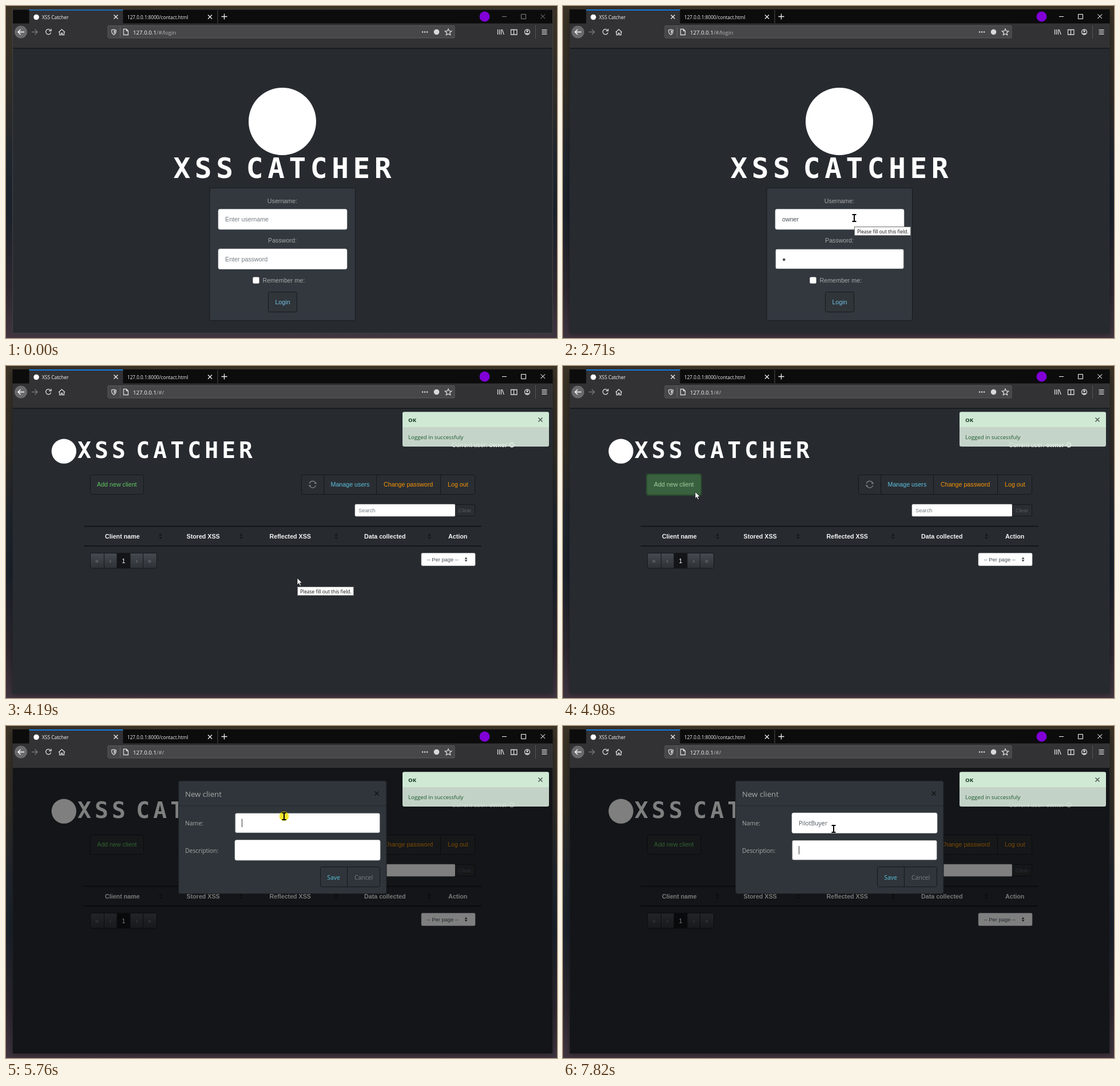
Write an HTML page that moves like this. It is 963x581 px and loops after 8 s.

```html
<!DOCTYPE html>
<html lang="en">
<head>
<meta charset="utf-8">
<title>XSS Catcher</title>
<style>
html, body { margin: 0; width: 100%; height: 100%; overflow: hidden; background: #1d2229; }
svg { display: block; width: 963px; height: 581px; }
text { font: 10.7px "Liberation Sans", Arial, sans-serif; white-space: pre; }
.ui { font-family: "Open Sans", "Noto Sans", sans-serif; font-size: 10.4px; }
.tab { font-size: 8.4px; }
.url { font-size: 9.7px; }
.mid { text-anchor: middle; }
.b, .b text { font-weight: bold; }
.small { font-size: 9.33px; }
.mark { font: bold 49.4px "DejaVu Sans Mono", monospace; letter-spacing: 7.6px; word-spacing: -22px; fill: #fff; }
.hint { fill: #757c83; }
.label { fill: #aaa; }
.typed { fill: #495057; }
.caret { fill: #333; }
.input { fill: #fff; stroke: #d0d3d6; stroke-width: .6; }
.focus { fill: none; stroke: #32383e; stroke-width: 1.5; }
.btn { fill: #2a2e33; stroke: #15171a; }
.line { fill: none; stroke: #d8d8da; stroke-width: 1.3; }
.green { fill: #62c462; }
.blue { fill: #5bc0de; }
.orange { fill: #f89406; }

.step, .tween { animation: 8s step-end infinite; }
.tween { animation-timing-function: linear; }
.idle { animation-name: idle; }
.active { animation-name: active; }
.login { animation-name: login; }
.home { animation-name: home; }
.toast { animation-name: toast; }
.tip { animation-name: tip; }
.press { animation-name: press; }
.dim { animation-name: dim; }
.modal { animation-name: fade; }
.slide { animation-name: slide; }
.cursor { animation-name: path; }
.arrow { animation-name: arrow; }
.beam { animation-name: beam; }
.click { animation-name: click; }

@keyframes idle { 0% { opacity: 1 } 8.625%, 100% { opacity: 0 } }
@keyframes active { 0% { opacity: 0 } 8.625%, 100% { opacity: 1 } }
@keyframes login { 0% { opacity: 1 } 48.5%, 100% { opacity: 0 } }
@keyframes home { 0% { opacity: 0 } 48.5%, 100% { opacity: 1 } }
@keyframes toast { 0%, 49.5% { opacity: 0 } 51.5%, 100% { opacity: 1 } }
@keyframes tip { 0% { opacity: 0 } 19.1% { opacity: 1 } 54.35%, 100% { opacity: 0 } }
@keyframes press { 0%, 61.2% { opacity: 0 } 63.1%, 68.1% { opacity: 1 } 70%, 100% { opacity: 0 } }
@keyframes dim { 0%, 65.6% { opacity: 0 } 67.5%, 100% { opacity: .5 } }
@keyframes fade { 0%, 65.46% { opacity: 0 } 67.34%, 100% { opacity: 1 } }
@keyframes slide {
  0% { transform: translateY(-33px) }
  65.46% { transform: translateY(-33px); animation-timing-function: ease-out }
  69.2%, 100% { transform: none }
}
@keyframes path {
  0% { transform: translate(-50px, -50px); animation-timing-function: step-end }
  1.75% { transform: translate(790px, 550px) }
  2.625% { transform: translate(600px, 455px) }
  3.625%, 5.6% { transform: translate(400px, 348px) }
  8%, 54.3% { transform: translate(509px, 371px) }
  55.4%, 57.2% { transform: translate(437px, 394px) }
  61.5%, 67.1% { transform: translate(231px, 220px) }
  71%, 73% { transform: translate(486px, 158px) }
  76.1%, 100% { transform: translate(473px, 180px) }
}
@keyframes arrow { 0% { opacity: 1 } 6.5% { opacity: 0 } 48.5% { opacity: 1 } 70%, 100% { opacity: 0 } }
@keyframes beam { 0% { opacity: 0 } 6.5% { opacity: 1 } 48.5% { opacity: 0 } 70%, 100% { opacity: 1 } }
@keyframes click {
  0% { opacity: 0 } 8.625% { opacity: .8 } 10% { opacity: 0 }
  63.1% { opacity: .8 } 64.2% { opacity: 0 }
  71.9% { opacity: .8 } 73.1%, 100% { opacity: 0 }
}
</style>
</head>
<body>
<svg viewBox="0 0 963 581">
  <defs>
    <linearGradient id="wall" x2="0" y2="1">
      <stop offset="0" stop-color="#3b3326"/>
      <stop offset=".25" stop-color="#302c26"/>
      <stop offset=".45" stop-color="#20262e"/>
      <stop offset=".62" stop-color="#1a212a"/>
      <stop offset=".85" stop-color="#2e2730"/>
      <stop offset="1" stop-color="#403540"/>
    </linearGradient>
    <linearGradient id="pager" x2="0" y2="1">
      <stop offset="0" stop-color="#454a50"/>
      <stop offset="1" stop-color="#2e3237"/>
    </linearGradient>
    <filter id="blur" x="-5%" y="-5%" width="110%" height="110%"><feGaussianBlur stdDeviation="5"/></filter>
    <path id="x" d="M-3.5-3.5 3.5 3.5M3.5-3.5-3.5 3.5"/>
    <path id="sort" d="M-3-1 0-5 3-1zM-3 1 0 5 3 1z"/>
    <circle id="brand" cx="483" cy="202" r="59" fill="#fff"/>
  </defs>

  <!-- Desktop -->
  <rect width="963" height="581" fill="url(#wall)"/>
  <rect class="step active" x="11" y="12" width="945" height="563" fill="#000" fill-opacity=".35" filter="url(#blur)"/>
  <rect x="11.5" y="6" width="944" height="567" fill="#272b30"/>

  <!-- Login page -->
  <g class="step login">
    <use href="#brand"/>
    <text class="mark" x="292.5" y="301">XSS CATCHER</text>
    <rect x="356" y="318.5" width="254.5" height="232" rx="3" fill="#32383e" stroke="#17191c"/>
    <text class="label mid" x="483" y="345">Username:</text>
    <rect class="input" x="371" y="355.5" width="225" height="35.5" rx="3"/>
    <text class="label mid" x="483" y="414">Password:</text>
    <rect class="input" x="371" y="425" width="225" height="35.5" rx="3"/>
    <g id="user">
      <rect class="focus" x="371" y="355.5" width="225" height="35.5" rx="3"/>
      <text class="hint" x="383" y="377">Enter username</text>
      <text class="typed" x="383" y="377"></text>
      <rect class="caret" y="367" width="1" height="12"/>
    </g>
    <g id="pass">
      <rect class="focus" x="371" y="425" width="225" height="35.5" rx="3"/>
      <text class="hint" x="383" y="446.5">Enter password</text>
      <text class="typed" x="383" y="446.5"></text>
      <rect class="caret" y="436" width="1" height="13"/>
    </g>
    <rect x="431.5" y="474.5" width="11" height="11" rx="2" fill="#fff" stroke="#aeb2b6"/>
    <text class="label" x="448.5" y="484">Remember me:</text>
    <rect x="458.5" y="500.5" width="50" height="35" rx="3" fill="#30353a" stroke="#17191c"/>
    <text class="mid" x="483.5" y="522" fill="#74bfe0">Login</text>
  </g>

  <!-- Client list -->
  <g class="step home">
    <use href="#brand" transform="translate(-76 75) scale(.367)"/>
    <text class="mark" transform="translate(125 161) scale(.803)">XSS CATCHER</text>
    <text x="779" y="141.5" fill="#fff">Current user: <tspan class="b">owner</tspan></text>
    <circle cx="884" cy="138" r="3.6" fill="none" stroke="#fff" stroke-width="2.4" stroke-dasharray="2 .83"/>
    <circle cx="884" cy="138" r="3" fill="none" stroke="#fff"/>
    <rect class="btn" x="147.5" y="190.5" width="93" height="34" rx="3"/>
    <text class="green mid" x="193.8" y="211">Add new client</text>
    <g class="tween press">
      <rect x="145" y="188" width="97.5" height="39" rx="4" fill="#2f6133"/>
      <rect x="147.5" y="190.5" width="93" height="34" rx="3" fill="#478b49" stroke="#62c462" stroke-opacity=".45"/>
      <text class="mid" x="193.8" y="211" fill="#d2d6d2">Add new client</text>
    </g>
    <rect class="btn" x="516.5" y="190.5" width="303" height="34" rx="3"/>
    <path d="M555.5 190v35M647.5 190v35M759.5 190v35" stroke="#15171a"/>
    <path d="M530.5 206a5.6 5.6 0 0 1 10.5-1.5M541.5 208.5a5.6 5.6 0 0 1-10.5 1.5" fill="none" stroke="#7a8288" stroke-width="1.3"/>
    <path d="M538.5 206h5l-2.5-3zM528.5 208.5h5l-2.5 3z" fill="#7a8288"/>
    <text class="blue" x="567.5" y="211">Manage users</text>
    <text class="orange" x="660" y="211">Change password</text>
    <text class="orange" x="772" y="211">Log out</text>
    <rect class="input" x="610" y="242" width="175" height="21" rx="2"/>
    <text class="hint small" x="616" y="256">Search</text>
    <rect class="btn" x="785.5" y="242.5" width="34" height="20" rx="2"/>
    <text class="small" x="791" y="256" fill="#575c61">Clear</text>
    <path d="M136 280.5H831M136 315H831" stroke="#0e1012" stroke-width="1.3"/>
    <g class="b" fill="#f4f4f4">
      <text x="173" y="302">Client name</text>
      <text x="315.5" y="302">Stored XSS</text>
      <text x="460.5" y="302">Reflected XSS</text>
      <text x="626" y="302">Data collected</text>
      <text x="773" y="302">Action</text>
    </g>
    <g fill="#15181b">
      <use href="#sort" x="270" y="298"/><use href="#sort" x="411" y="298"/>
      <use href="#sort" x="577" y="298"/><use href="#sort" x="740" y="298"/>
    </g>
    <rect x="147.5" y="327.5" width="116" height="26.5" rx="3" fill="url(#pager)" stroke="#15171a"/>
    <rect x="193.5" y="327.5" width="24" height="26.5" fill="#131518"/>
    <path d="M171.5 328v26M239.5 328v26" stroke="#15171a"/>
    <g class="mid" fill="#7a8288">
      <text x="159" y="345">«</text><text x="182.5" y="345">‹</text>
      <text x="205.5" y="345" fill="#fff">1</text>
      <text x="228.5" y="345">›</text><text x="251" y="345">»</text>
    </g>
    <rect class="input" x="726" y="327.5" width="94" height="22" rx="2"/>
    <text class="typed small" x="735.5" y="342">-- Per page --</text>
    <use href="#sort" transform="translate(804 338.5) scale(.8)" fill="#343a40"/>

    <rect class="tween dim" x="12" y="74" width="943" height="499"/>

    <g class="tween modal">
      <g class="tween slide">
        <rect x="301.5" y="96" width="363.5" height="197.5" rx="3" fill="#2f353a" stroke="#1c1f22"/>
        <path d="M302 139.5H665" stroke="#22262a"/>
        <text class="ui" x="313" y="123.5" fill="#aaa" style="font-size:13.2px">New client</text>
        <use href="#x" x="648" y="118" stroke="#101214" stroke-width="1.3"/>
        <text class="ui label" x="313" y="174">Name:</text>
        <text class="ui label" x="313" y="221.5">Description:</text>
        <rect class="input" x="400" y="152" width="254" height="35.5" rx="3"/>
        <rect class="input" x="400" y="199.5" width="254" height="35.5" rx="3"/>
        <g id="name">
          <rect class="focus" x="400" y="152" width="254" height="35.5" rx="3"/>
          <text class="ui typed" x="412" y="174"></text>
          <rect class="caret" y="162.5" width="1" height="14.5"/>
        </g>
        <g id="about">
          <rect class="focus" x="400" y="199.5" width="254" height="35.5" rx="3"/>
          <text class="ui typed" x="412" y="221.5"></text>
          <rect class="caret" y="210" width="1" height="14.5"/>
        </g>
        <rect x="549.5" y="246.5" width="104" height="35" rx="3" fill="#2f353a" stroke="#15171a"/>
        <path d="M596.5 246v36" stroke="#15171a"/>
        <text class="ui blue mid" x="572.5" y="268.5">Save</text>
        <text class="ui mid" x="625" y="268.5" fill="#7a8288">Cancel</text>
      </g>
    </g>

    <g class="tween toast">
      <rect x="693" y="80.5" width="256" height="60.5" rx="3" fill="#d8e7db" fill-opacity=".9"/>
      <path d="M693 107V83.5a3 3 0 0 1 3-3H946a3 3 0 0 1 3 3V107z" fill="#cfe9d5"/>
      <text class="ui b" x="703" y="98" fill="#123a1d" style="font-size:9.6px">OK</text>
      <use href="#x" x="934" y="94" stroke="#4e5a51" stroke-width="1.6"/>
      <text class="ui" x="703" y="128" fill="#1c5a2c" style="font-size:9.6px">Logged in successfuly</text>
    </g>
  </g>

  <!-- Browser frame -->
  <rect x="11.5" y="6" width="944" height="25" fill="#0c0c0d"/>
  <rect x="11.5" y="30.5" width="944" height="43" fill="#323234"/>
  <path d="M12 74H955" stroke="#0c0c0d"/>
  <rect x="40.5" y="6" width="164" height="25" fill="#323234"/>
  <rect x="40.5" y="6" width="164" height="1.8" fill="#0a84ff"/>
  <path d="M370 7v23" stroke="#4a4a4c"/>
  <circle cx="53" cy="19.5" r="4.8" fill="#fff"/>
  <text class="ui tab" x="63" y="22.5" fill="#f9f9fa">XSS Catcher</text>
  <text class="ui tab" x="212" y="22.5" fill="#f0f0f2" style="font-size:8.2px">127.0.0.1:8000/contact.html</text>
  <g class="line" style="stroke:#f0f0f0">
    <use href="#x" x="192" y="19"/><use href="#x" x="356.5" y="19"/>
    <path d="M376.5 18.5h10M381.5 13.5v10"/>
  </g>
  <circle cx="836.5" cy="18.5" r="9" fill="#8000d7"/>
  <g fill="none" stroke="#858585">
    <path d="M867 18.5h8M900.5 14.5h8v8h-8zM934.5 14.5l7.5 7.5M942 14.5l-7.5 7.5"/>
    <path class="step active" stroke="#fff" d="M867 18.5h8M900.5 14.5h8v8h-8zM934.5 14.5l7.5 7.5M942 14.5l-7.5 7.5"/>
  </g>
  <rect class="step idle" x="11.5" y="6" width="944" height="566.5" fill="none" stroke="#414143"/>

  <circle cx="26" cy="45.5" r="11" fill="#6a6a6c"/>
  <path class="line" style="stroke:#fff" d="M32 45.5H21M25.5 41l-4.5 4.5 4.5 4.5"/>
  <path class="line" style="stroke:#77777a" d="M45 45.5h10M50.5 41l4.5 4.5-4.5 4.5"/>
  <path class="line" d="M78 42.5a4.6 4.6 0 1 0 .6 4M79 40v3.5h-4M92 46l5.5-5 5.5 5M93.5 45v5.5h3v-3h2v3h3V45"/>
  <rect x="178" y="34.5" width="606" height="21.5" rx="1.5" fill="#474749" stroke="#5a5a5c"/>
  <path class="line" d="M188.5 41l4 1.3c0 4-1 6.5-4 8.2-3-1.7-4-4.2-4-8.2zM205.5 40.5h5l3 3v7h-8zM210.5 40.5v3h3"/>
  <path d="M188.5 42.5v6.3c1.8-1.3 2.4-3 2.5-5.6z" fill="#d8d8da"/>
  <path d="M199.5 37v17" stroke="#68686a"/>
  <text class="ui url" x="222" y="49.5" fill="#f9f9fa">127.0.0.1<tspan fill="#b1b1b3">/#/</tspan></text>
  <text class="ui url step login" x="275.5" y="49.5" fill="#b1b1b3">login</text>
  <g fill="#d8d8da">
    <circle cx="728" cy="45.5" r="1.3"/><circle cx="732" cy="45.5" r="1.3"/><circle cx="736" cy="45.5" r="1.3"/>
    <circle cx="752.5" cy="45.5" r="4.8"/>
  </g>
  <path class="line" d="M773 40l1.7 3.7 4 .4-3 2.7.9 4-3.6-2.1-3.6 2.1.9-4-3-2.7 4-.4z"/>
  <path class="line" d="M859.5 41v9M862.5 41v9M865.5 41v9M867 41l3.3 9M882.5 41.5h10.5v8.5h-10.5zM887.5 42v8M936.5 42h9M936.5 45.5h9M936.5 49h9"/>
  <circle class="line" cx="911" cy="45.5" r="4.5"/>
  <circle cx="911" cy="44" r="1.7" fill="#d8d8da"/>
  <path d="M907.5 47.5h7a4 4 0 0 1-7 0z" fill="#d8d8da"/>
  <path d="M925.5 34v23" stroke="#55555a"/>

  <g class="step tip">
    <rect x="509.5" y="386.5" width="98" height="15" fill="#fff" stroke="#6f6f6f"/>
    <text class="ui tab" x="514" y="397.5" fill="#111">Please fill out this field.</text>
  </g>
  <g class="tween cursor">
    <circle class="step click" r="8.3" fill="#f5e000"/>
    <path class="step arrow" d="M0 0v12l2.8-2.6 1.9 4.4 2-.9-1.9-4.2h3.8z" fill="#fff" stroke="#111" stroke-width=".8"/>
    <path class="step beam" d="M-3.5-6h2.7l.8.6.8-.6h2.7M0-5.5v11M-3.5 6h2.7l.8-.6.8.6h2.7" fill="none" stroke="#000" stroke-width="2"/>
  </g>
</svg>
<script>
const LOOP = 8000, BLINK = 530;

// "at" is the time of each keystroke; focus lasts from "from" to "to".
const fields = [
  { id: 'user', text: 'owner', at: [1530, 1690, 1770, 1920, 2000], from: 690, to: 2160 },
  { id: 'pass', text: '●'.repeat(8), at: [2710, 3010, 3170, 3250, 3330, 3490, 3640, 3640], from: 2160, to: 3880, caretTo: 2690 },
  { id: 'name', text: 'PilotBuyer', at: [6320, 6480, 6720, 6870, 7030, 7190, 7260, 7420, 7500, 7580], from: 5540, to: 7740 },
  { id: 'about', text: '', at: [], from: 7740, to: LOOP },
].map(f => {
  const g = document.getElementById(f.id);
  const pick = name => g.querySelector('.' + name);
  return { caretTo: f.to, ...f, hint: pick('hint'), typed: pick('typed'), caret: pick('caret'), focus: pick('focus') };
});

const show = (el, on) => el.setAttribute('visibility', on ? 'visible' : 'hidden');

function drawField(f, t) {
  const keys = f.at.filter(k => k <= t);
  const value = f.text.slice(0, keys.length);
  if (f.typed.textContent !== value) f.typed.textContent = value;
  if (f.hint) show(f.hint, !value);
  show(f.focus, t >= f.from && t < f.to);
  const last = Math.max(f.from, ...keys);
  const lit = t >= f.from && t < f.caretTo && (t - last) % (2 * BLINK) < BLINK;
  show(f.caret, lit);
  if (lit) {
    const width = value ? f.typed.getComputedTextLength() : 0;
    f.caret.setAttribute('x', +f.typed.getAttribute('x') + width);
  }
}

let start;
function tick(now) {
  start ??= now;
  const t = (now - start) % LOOP;
  fields.forEach(f => drawField(f, t));
  requestAnimationFrame(tick);
}
requestAnimationFrame(tick);
</script>
</body>
</html>
```
